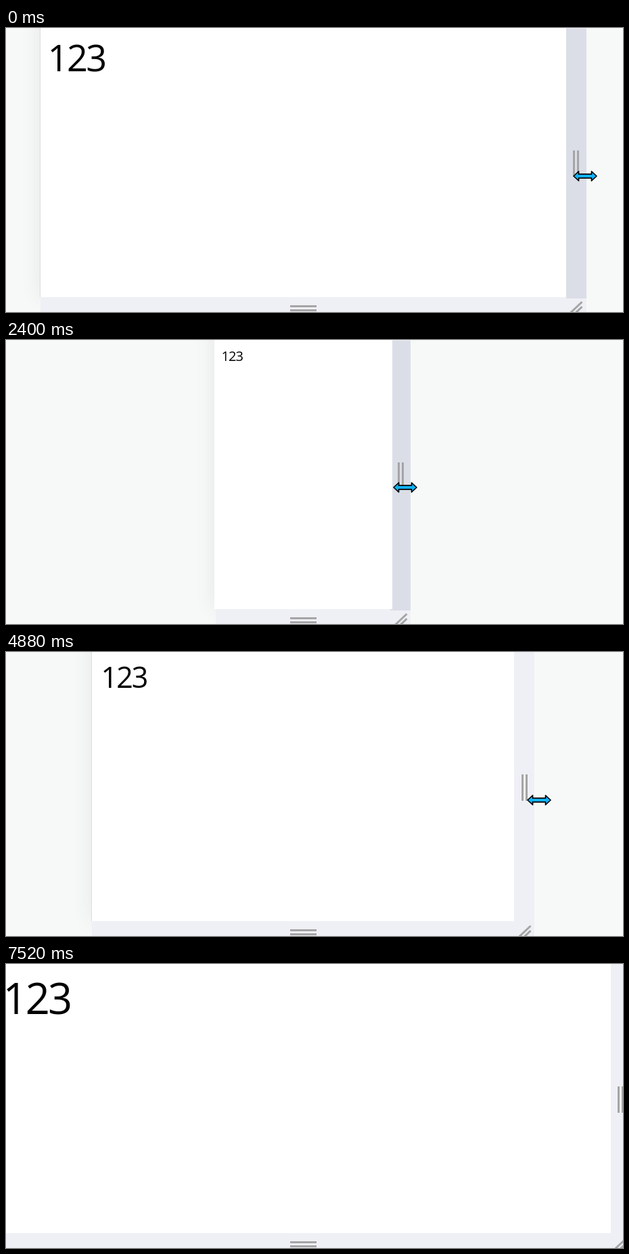
Write an HTML page with a canvas that moves like this. It is 912 by 420 pixels and loops after 8680 ms.

```html
<!DOCTYPE html>
<html lang="en">
<head>
<meta charset="utf-8">
<title>Resizable panel</title>
<style>
  html, body { margin: 0; width: 100%; height: 100%; overflow: hidden; background: #f7f9f8; }
  canvas { display: block; }
</style>
</head>
<body>
<canvas id="stage" width="912" height="420"></canvas>
<script>
const ctx = document.getElementById('stage').getContext('2d');
const LOOP = 8680;
const MIRROR = 909;        // left edge + right edge of the centred panel
const BAR = 30;
const PAGE_DELAY = 20;     // ms the page trails the frame
const CURSOR_LEAD = 50;    // ms the cursor runs ahead of the frame
const MAX_LEAD = 8.5;
const LIGHT = [239, 240, 245];
const DARK = [219, 222, 231];

const clamp = (v, min, max) => Math.min(max, Math.max(min, v));
const ramp = (t, start, end, power = 1) => clamp((t - start) / (end - start), 0, 1) ** power;

// Speeding up inwards, steady to the narrowest width, then back out past the stage.
function panelRight(t) {
  return 858
    - 164 * ramp(t, 760, 1640, 2.1)
    - 181 * ramp(t, 1640, 3120, 0.96)
    + 411 * ramp(t, 3640, 5720, 0.823);
}

function cursorPosition(t) {
  const right = panelRight(t);
  const lead = clamp(panelRight(t + CURSOR_LEAD) - right, -MAX_LEAD, MAX_LEAD);
  const idleDrift = 8 * (ramp(t, 3640, 3760) - ramp(t, 3240, 3400));
  const leave = 38 * ramp(t, 6320, 6400);
  const wobble = Math.sin(4 * Math.PI * t / LOOP);
  return [Math.round(right - 2 + lead + idleDrift + leave), Math.round(218.7 + wobble)];
}

function barColor(t) {
  const hover = 1 - ramp(t, 3720, 3920) + ramp(t, 5720, 5920) - ramp(t, 6360, 6560);
  return mixColor(hover);
}

const mixColor = k => `rgb(${LIGHT.map((c, i) => Math.round(c + (DARK[i] - c) * k))})`;

function rect(x0, y0, x1, y1, color) {
  ctx.fillStyle = color;
  ctx.fillRect(x0, y0, x1 - x0, y1 - y0);
}

function line(x0, y0, x1, y1) {
  ctx.beginPath();
  ctx.moveTo(x0, y0);
  ctx.lineTo(x1, y1);
  ctx.stroke();
}

function drawGrips(right) {
  ctx.strokeStyle = '#a5a5a5';
  ctx.lineWidth = 3;
  for (const d of [0, 6]) {
    line(right - 18.5 + d, 181, right - 18.5 + d, 220);
    line(420, 411.5 + d, 459, 411.5 + d);
    line(right - 6.5, 405 + d * 1.2, right - 24.5, 422 + d * 1.2);
  }
}

function drawCursor(x, y) {
  ctx.beginPath();
  for (const s of [1, -1]) {
    for (const [px, py] of [[-17, 0], [-9.5, -7], [-9.5, -2.8], [9.5, -2.8], [9.5, -7]]) {
      ctx.lineTo(x + s * px, y + s * py);
    }
  }
  ctx.closePath();
  ctx.lineJoin = 'round';
  ctx.lineWidth = 1.7;
  ctx.strokeStyle = '#000';
  ctx.fillStyle = '#10b2fa';
  ctx.fill();
  ctx.stroke();
}

function draw(t) {
  const exactRight = panelRight(t);
  const right = Math.floor(exactRight);
  const outer = Math.ceil(exactRight);
  const left = MIRROR - outer;

  const pageOuter = Math.ceil(panelRight(t - PAGE_DELAY));
  const pageLeft = MIRROR - pageOuter;
  const pageRight = pageOuter - BAR;
  const whiteLeft = Math.min(left, pageLeft);

  rect(0, 0, 912, 420, '#f7f9f8');
  ctx.save();
  ctx.shadowColor = 'rgba(0,0,0,0.08)';
  ctx.shadowBlur = 30;
  rect(whiteLeft, -60, right - BAR, 398, '#fff');
  ctx.restore();

  rect(left - 1, 0, left, 398, '#dcdddd');
  rect(right - BAR, 0, right, 420, mixColor(0));
  rect(left, 398, right, 420, mixColor(0));
  rect(right - BAR, 1, right, 400, barColor(t));
  rect(whiteLeft, 0, Math.max(right - BAR, pageRight), 398, '#fff');
  drawGrips(outer);

  const size = Math.max(20, (pageRight - pageLeft) / 14.4);
  ctx.font = `${size}px "Open Sans", "Noto Sans", sans-serif`;
  ctx.letterSpacing = `${-0.045 * size}px`;
  ctx.fillStyle = '#000';
  ctx.fillText('123', pageLeft + 10.5, size + 10.5);

  drawCursor(...cursorPosition(t));
}

function tick() {
  draw(performance.now() % LOOP);
  requestAnimationFrame(tick);
}
tick();
</script>
</body>
</html>
```
